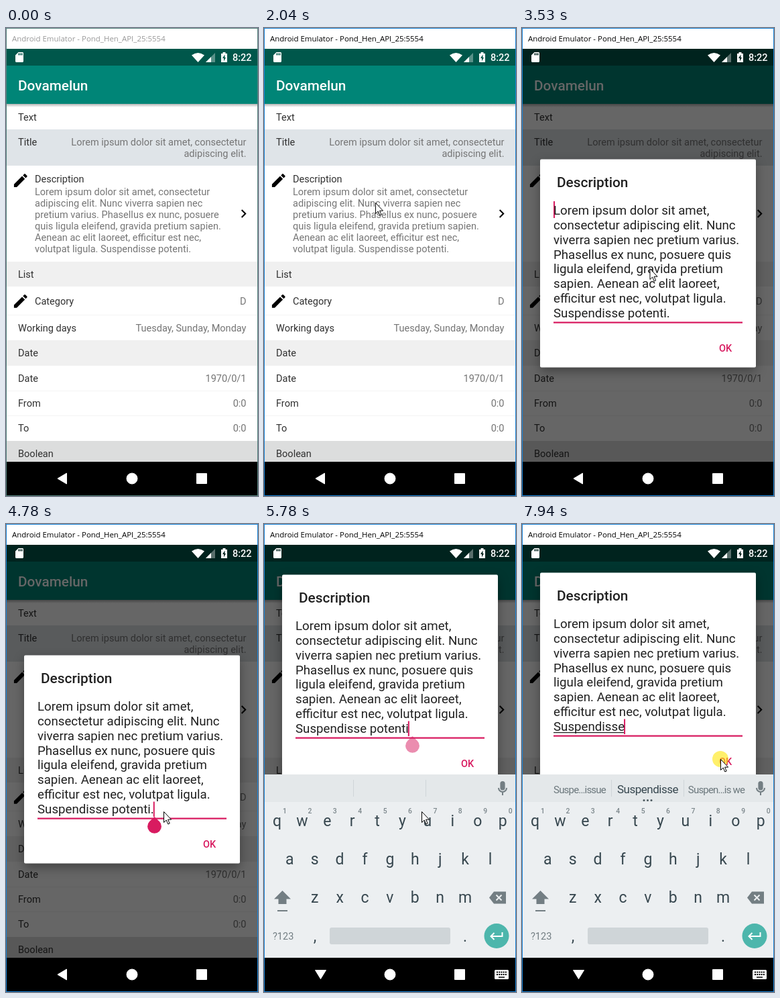
These frames come from a looping animation (376 by 697 pixels, 8000 ms). An HTML page:

```html
<!DOCTYPE html>
<html lang="en">
<head>
<meta charset="utf-8">
<title>Description dialog</title>
<style>
  html, body { margin: 0; width: 100%; height: 100%; overflow: hidden; background: #fff }
  svg { display: block; font: 14.54px Roboto, sans-serif }
  text { white-space: pre }
  .label { fill: #303030 }
  .value { fill: #757575 }
  .end { text-anchor: end }
  .mid { text-anchor: middle }
  .medium { font-weight: 500 }
  .body { font-size: 18.7px; fill: #212121 }
  .key { font-size: 23px; fill: #37474f }
  .hint { font-size: 10.4px; font-weight: 500; fill: #7b868b }
  .word { font-size: 15px; letter-spacing: -.8px; fill: #6b777c }
  .best { font-size: 17px; letter-spacing: -.5px; fill: #37474f }
  .soft { fill: #737e83 }
  .pink { fill: #d81b60 }
  #panel { filter: drop-shadow(0 6px 8px rgba(0, 0, 0, .35)) }
</style>
</head>
<body>
<svg width="376" height="697" viewBox="0 0 376 697">
  <defs>
    <linearGradient id="fade" x2="0" y2="1">
      <stop stop-opacity=".3"/><stop offset="1" stop-opacity="0"/>
    </linearGradient>
    <path id="pencil" transform="scale(1.1)" d="M3 17.25V21h3.75L17.81 9.94l-3.75-3.75zM20.71 7.04c.39-.39.39-1.02 0-1.41l-2.34-2.34c-.39-.39-1.02-.39-1.41 0l-1.83 1.83 3.75 3.75z"/>
  </defs>

  <rect width="376" height="697" fill="#fff"/>
  <g id="page">
    <path fill="#00574b" d="M0 31h376v25H0z"/>
    <path fill="#008577" d="M0 56h376v57H0z"/>
    <text class="medium" x="18" y="93" font-size="20.8" fill="#fff">Dovamelun</text>
    <path fill="#dfe4e8" d="M0 151h376v54H0z"/>
    <path fill="#f0f0f0" d="M0 348h376v37H0zM0 465h376v38H0z"/>
    <path fill="#dcdddd" d="M0 615h376v31H0z"/>
    <path fill="#f4f4f4" d="M0 427h376v1H0zM0 540h376v1H0zM0 577h376v1H0z"/>
    <path fill="url(#fade)" d="M0 113h376v5H0z"/>
    <use href="#pencil" transform="translate(8.6 213.8)"/>
    <use href="#pencil" transform="translate(8.6 393.6)"/>
    <path transform="translate(342 264) scale(1.04)" d="M10 6L8.59 7.41 13.17 12l-4.58 4.59L10 18l6-6z"/>
  </g>
  <path d="M0 646h376v51H0z"/>
  <path id="dim" d="M0 31h376v615H0z"/>

  <g fill="#fff" fill-rule="evenodd">
    <path transform="translate(11 34.5) scale(.75)" d="M18 2h-8L4 8v12c0 1.1.9 2 2 2h12c1.1 0 2-.9 2-2V4c0-1.1-.9-2-2-2zm-6 6h-2V4h2zm3 0h-2V4h2zm3 0h-2V4h2z"/>
    <path d="M277 40.5q9.5-7 19 0L286.5 51z"/>
    <path opacity=".35" d="M312 37v14h-14z"/>
    <path d="M306 43v8h-8z"/>
    <path d="M321 38h2.5v-2h4v2h2.5v13h-9zM326.5 39.5l-3.5 5.5h2v4.5l3-5.5h-1.5z"/>
    <text class="medium" x="338" y="49">8:22</text>
  </g>

  <g id="dialog">
    <rect id="panel" x="27" y="195.5" width="322" height="310" rx="2" fill="#fff"/>
    <text class="medium" x="52" y="237" font-size="20.8" fill="#212121">Description</text>
    <path class="pink" d="M47 437.5h282v2.2H47z"/>
    <text class="medium pink" x="294" y="482">OK</text>
    <path id="underline" d="M47 433h106v1.3H47z" fill="#212121"/>
    <rect id="caret" class="pink" width="2"/>
  </g>

  <g id="keyboard">
    <path fill="#eceff1" d="M0 373h376v273H0z"/>
    <path fill="#e4e8ea" d="M0 373h376v41H0z"/>
    <path fill="#cfd5d8" d="M133 381h1v25h-1zM241 381h1v25h-1z"/>
    <g class="soft">
      <path d="M356 383a3.6 3.6 0 0 1 3.6 3.6v6.4a3.6 3.6 0 0 1-7.2 0v-6.4a3.6 3.6 0 0 1 3.6-3.6z"/>
      <path d="M350 393a6 6 0 0 0 12 0M356 399v5" fill="none" stroke="#737e83" stroke-width="2"/>
      <path d="M27.500 546L40 558.500h-6.500V566h-12v-7.500H15zM20 575h15v2H20z"/>
      <path d="M343 547.500h18v18h-18l-7-9z"/>
      <text x="13" y="619">?123</text>
    </g>
    <path d="M346.500 552.500l8 8m0-8l-8 8" stroke="#eceff1" stroke-width="2"/>
    <rect x="98" y="601" width="180" height="25" rx="3" fill="#cfd5d8"/>
    <circle cx="347" cy="613.500" r="18.500" fill="#4db6ac"/>
    <path d="M355.500 608v6h-17m5-5l-5 5 5 5" fill="none" stroke="#fff" stroke-width="2"/>
    <g id="hints" class="mid">
      <text class="word" x="86" y="401">Suspe…issue</text>
      <text class="best" x="187.500" y="401">Suspendisse</text>
      <text class="word" x="290" y="401">Suspen…is we</text>
      <g fill="#4a575d">
        <circle cx="182" cy="411.500" r="1.500"/><circle cx="187.500" cy="411.500" r="1.500"/><circle cx="193" cy="411.500" r="1.500"/>
      </g>
    </g>
  </g>

  <g fill="#fff" stroke="#fff" stroke-linejoin="round">
    <path id="back"/>
    <circle cx="188" cy="671" r="8"/>
    <path d="M284.500 663.500h15v15h-15z"/>
  </g>
  <g id="imeIcon">
    <rect x="344" y="664" width="21" height="14" rx="1.500" fill="#fff"/>
    <path d="M347 667.500h15M347 671h15" stroke="#000" stroke-width="2" stroke-dasharray="2 1.200"/>
    <path d="M350 675h9" stroke="#000" stroke-width="1.500"/>
  </g>

  <path id="handle" class="pink" d="M221.500 436l7.400 7.100a10.400 10.400 0 1 1-14.800 0z"/>

  <path fill="#fff" d="M0 0h376v31H0z"/>
  <text id="caption" x="9" y="20" style="font: 11.45px 'Open Sans', sans-serif">Android Emulator - Pond_Hen_API_25:5554</text>
  <rect id="frame" x=".5" y=".5" width="375" height="696" fill="none"/>

  <g id="mouse">
    <circle id="click" r="12" fill="#ffe600" opacity=".58"/>
    <path d="M.5.5v16l3.700-3.500 2.600 6 2.400-1-2.600-5.800h5z" fill="#fff" stroke="#000"/>
  </g>
</svg>
<script>
const LOOP = 8000;
const $ = id => document.getElementById(id);
const set = (el, attrs) => { for (const k in attrs) el.setAttribute(k, attrs[k]); };
const show = (id, on) => set($(id), { visibility: on ? 'visible' : 'hidden' });

function write(parent, cls, x, y, str) {
  const el = document.createElementNS('http://www.w3.org/2000/svg', 'text');
  set(el, { class: cls, x, y });
  el.textContent = str;
  return $(parent).appendChild(el);
}

// List rows: label x, baseline, label, value
[
  [18, 138, 'Text'], [18, 175, 'Title', 'Lorem ipsum dolor sit amet, consectetur'],
  [43, 230, 'Description'], [18, 372, 'List'], [43, 412, 'Category', 'D'],
  [18, 452, 'Working days', 'Tuesday, Sunday, Monday'], [18, 489, 'Date'],
  [18, 527, 'Date', '1970/0/1'], [18, 564, 'From', '0:0'], [18, 601, 'To', '0:0'], [18, 639, 'Boolean']
].forEach(([x, y, label, value]) => {
  write('page', 'label', x, y, label);
  if (value) write('page', 'value end', 358.5, y, value);
});
write('page', 'value end', 358.5, 192, 'adipiscing elit.');
[
  'Lorem ipsum dolor sit amet, consectetur', 'adipiscing elit. Nunc viverra sapien nec',
  'pretium varius. Phasellus ex nunc, posuere', 'quis ligula eleifend, gravida pretium sapien.',
  'Aenean ac elit laoreet, efficitur est nec,', 'volutpat ligula. Suspendisse potenti.'
].forEach((line, i) => write('page', 'value', 43, 249 + i * 17, line));

const ENDING = 'Suspendisse potenti.';
const lines = [
  'Lorem ipsum dolor sit amet,', 'consectetur adipiscing elit. Nunc', 'viverra sapien nec pretium varius.',
  'Phasellus ex nunc, posuere quis', 'ligula eleifend, gravida pretium', 'sapien. Aenean ac elit laoreet,',
  'efficitur est nec, volutpat ligula.', ENDING
].map((line, i) => write('dialog', 'body', 47, Math.round(278 + i * 21.86), line));
const last = lines[7];

[['qwertyuiop', 19.5, 450], ['asdfghjkl', 38.3, 507], ['zxcvbnm', 75.7, 564]].forEach(([row, x, y]) =>
  [...row].forEach((c, i) => write('keyboard', 'key mid', x + i * 37.4, y, c)));
[...'1234567890'].forEach((c, i) => write('keyboard', 'hint mid', 31 + i * 37.4, 430.5, c));
write('keyboard', 'key mid', 76, 622, ',');
write('keyboard', 'key mid', 300, 622, '.');

// Latest value whose time has been reached: step(t, start, time, value, time, value, ...)
function step(t, value, ...changes) {
  for (let i = 0; i < changes.length && t >= changes[i]; i += 2) value = changes[i + 1];
  return value;
}
const within = (t, ...spans) => spans.some(([a, b]) => t >= a && t < b);

// Pointer moves: start, end, from, to
const moves = [
  [1020, 1810, 295, 692, 166, 260],
  [3235, 4070, 166, 260, 235, 428],
  [7270, 7790, 235, 428, 296, 350]
];
function pointer(t) {
  const [a, b, x0, y0, x1, y1] = moves.filter(m => t >= m[0]).pop() || moves[0];
  const p = Math.min(1, Math.max(0, (t - a) / (b - a)));
  return [x0 + (x1 - x0) * p, y0 + (y1 - y0) * p * (2 - p)];
}

function draw(t) {
  const active = t >= 1960;
  set($('caption'), { fill: active ? '#000' : '#999' });
  set($('frame'), { stroke: active ? '#1883d7' : '#52817d' });

  const lift = step(t, 0, 5470, -113, 5780, -120, 5850, -123);
  const moved = `translate(0 ${lift})`;
  set($('dim'), { opacity: step(t, 0, 2740, .02, 2830, .3, 2900, .6) });
  set($('dialog'), { opacity: step(t, 0, 2740, .33, 2830, .8, 2900, 1), transform: moved });

  const cut = step(t, 0, 5780, 1, 6170, 2, 6250, 3, 6330, 5, 6410, 6, 6480, 8, 6630, 9);
  last.textContent = ENDING.slice(0, ENDING.length - cut);
  show('underline', t >= 6860);
  const top = t < 4140;
  set($('caret'), {
    x: top ? 47 : 46 + last.getComputedTextLength(),
    y: top ? 258 : 413.5,
    height: top ? 25 : 22.5
  });
  show('caret', within(t, [3380, 3880], [4380, 4930], [5780, 6020], [6170, 7340], [7790, LOOP]));

  show('handle', within(t, [4780, 5850]));
  set($('handle'), { transform: moved, opacity: step(t, 1, 5780, .5) });

  set($('keyboard'), {
    opacity: step(t, 0, 5390, .5, 5470, .95, 5780, 1),
    transform: `translate(0 ${step(t, 63, 5470, 10, 5780, 0)})`
  });
  show('hints', t >= 6860);
  show('imeIcon', t >= 4930);
  set($('back'), { d: t < 4930 ? 'M77 671l13.500-8v16z' : 'M76.500 664.500h16l-8 13z' });

  show('mouse', t >= 1050);
  set($('mouse'), { transform: `translate(${pointer(t)})` });
  set($('click'), { display: within(t, [1880, 2040], [4140, 4230], [7940, LOOP]) ? 'inline' : 'none' });
}

const start = performance.now();
function tick(now) {
  draw(Math.max(0, now - start) % LOOP);
  requestAnimationFrame(tick);
}
tick(start);
</script>
</body>
</html>
```
